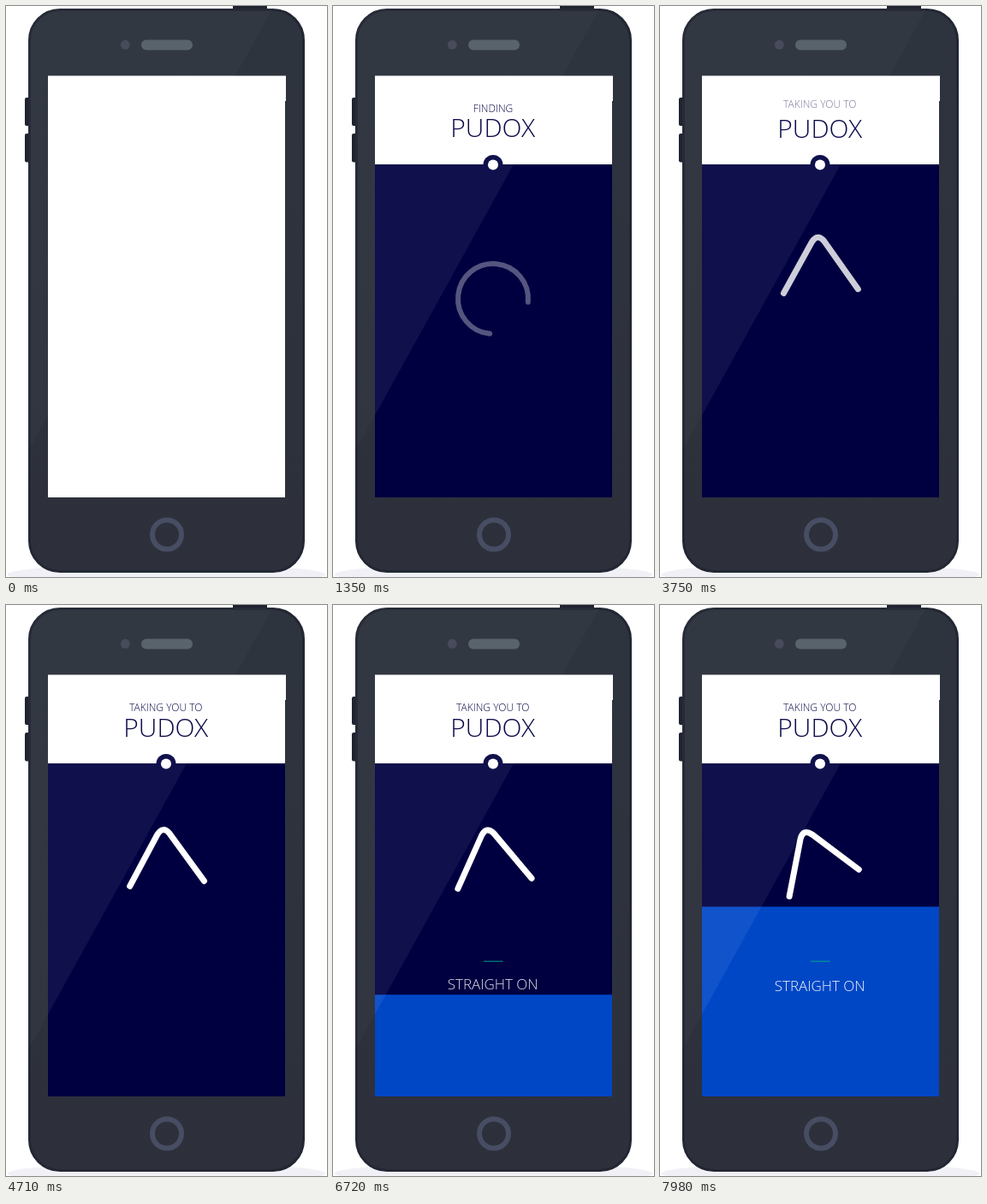
Write an HTML page that moves like this. It is 375 by 667 pixels and loops after 8 s.

```html
<!DOCTYPE html>
<html lang="en">
<head>
<meta charset="utf-8">
<title>Wayfinder phone</title>
<style>
  html, body { margin: 0; width: 100%; height: 100%; overflow: hidden; background: #fff; }
  svg { display: block; width: 375px; height: 667px; }
  text { font-family: "Open Sans", sans-serif; font-weight: 300; text-anchor: middle; fill: #0b0b4b; }
  .small { font-size: 12px; }
</style>
</head>
<body>
<svg viewBox="0 0 375 667">
  <defs>
    <linearGradient id="shell" x2="0" y2="1">
      <stop offset="0" stop-color="#2e343e"/>
      <stop offset="1" stop-color="#2d303b"/>
    </linearGradient>
    <clipPath id="screen"><path d="M49 81.5H327V111H326V574H49Z"/></clipPath>
    <clipPath id="body"><rect x="26" y="3" width="323" height="659" rx="37"/></clipPath>
    <path id="glare" d="M0 0H313.2L0 567Z" fill="#fff"/>
  </defs>

  <ellipse cx="187.5" cy="664" rx="186" ry="12" fill="#f0f0f6"/>
  <g fill="#1f2430">
    <rect x="265" y="-4" width="40" height="12" rx="2"/>
    <rect x="22" y="107" width="8" height="33" rx="2"/>
    <rect x="22" y="149" width="8" height="33.5" rx="2"/>
  </g>
  <rect x="27.5" y="4.5" width="320" height="656" rx="35.5" fill="url(#shell)" stroke="#222733" stroke-width="3"/>
  <use href="#glare" opacity=".018" clip-path="url(#body)"/>
  <circle cx="139.3" cy="45.3" r="5.5" fill="#474b5c"/>
  <rect x="158" y="39.5" width="60" height="12" rx="6" fill="#59636b"/>
  <circle cx="188" cy="617.5" r="17" fill="none" stroke="#474d62" stroke-width="6"/>

  <g clip-path="url(#screen)">
    <rect x="49" y="81" width="278" height="494" fill="#fff"/>
    <g id="panel">
      <rect x="49" width="277" height="500" fill="#000040"/>
      <circle cx="187" cy=".5" r="11.5" fill="#000040"/>
    </g>
    <rect id="progress" x="49" width="277" height="500" fill="#0047c6"/>
    <use href="#glare" opacity=".062"/>

    <circle id="pin" cx="187" cy=".5" r="6" fill="#fff"/>
    <text id="finding" class="small" x="187" y="124">FINDING</text>
    <text id="taking" class="small" x="186.7" y="124">TAKING YOU TO</text>
    <text id="place" x="186.7" y="153.5" font-size="30">PUDOX</text>
    <g fill="none" stroke="#fff" stroke-linecap="round">
      <path id="spinner" d="M29 -29A41 41 0 1 0 29 29" stroke-width="6"/>
      <path id="arrow" d="M-43.5 12.5L-7.2 -45.5Q0 -55.5 7.2 -45.5L43.5 12.5" stroke-width="7"/>
    </g>
    <path id="rule" d="M176 416.3H198.5" stroke="#00a38c" stroke-width="1.4"/>
    <text id="direction" x="186.7" y="451" font-size="17" style="fill:#fff">STRAIGHT ON</text>
  </g>
</svg>
<script>
const LOOP = 8000;
const el = id => document.getElementById(id);
const phase = (t, start, length) => Math.min(1, Math.max(0, (t - start) / length));
const easeOut = (p, power) => 1 - (1 - p) ** power;

function pose(id, opacity, x, y, angle = 0) {
  el(id).setAttribute("opacity", opacity);
  el(id).setAttribute("transform", `translate(${x} ${y}) rotate(${angle})`);
}

// Headings settle downwards while they fade in.
function settle(id, p, fade = 1) {
  pose(id, easeOut(p, 4) * fade, 0, -7 * (1 - p) ** 2);
}

// [time, degrees] turning points, joined by cosine easing
const turns = [[3300, 0], [4250, -7], [5500, 3], [8100, -21.2]];

function heading(t) {
  let angle = turns[0][1];
  for (let i = 1; i < turns.length; i++) {
    const [start, from] = turns[i - 1], [end, to] = turns[i];
    if (t >= start) angle = from + (to - from) * (1 - Math.cos(Math.PI * phase(t, start, end - start))) / 2;
  }
  return angle;
}

function draw(t) {
  const panelY = 587 - 402 * easeOut(phase(t, 60, 1000), 3);
  pose("panel", 1, 0, panelY);
  pose("pin", 1, 0, panelY);

  const intro = phase(t, 200, 1200);
  const leave = phase(t, 2490, 645) ** 2;
  settle("place", intro);
  if (leave > 0) pose("finding", 1 - leave, 0, -6 * leave);
  else settle("finding", intro);
  settle("taking", phase(t, 3500, 1400));

  // The gap in the ring is centred on 50 degrees at 1350 ms.
  const spin = 50 + (t - 1350) * 568 / 1410;
  pose("spinner", phase(t, 1100, 750) * (1 - leave), 187, 342 + 40 * leave, spin);

  const enter = easeOut(phase(t, 3300, 800), 2);
  pose("arrow", enter, 187.2, 313 + 40 * (1 - enter), heading(t));

  pose("progress", 1, 0, 575 - 0.0816 * Math.max(0, t - 5253));
  const guide = phase(t, 5250, 3000);
  settle("direction", guide, 0.95);
  pose("rule", 0.75 * easeOut(guide, 4), 0, 0);
}

function tick() {
  draw(performance.now() % LOOP);
  requestAnimationFrame(tick);
}
tick();
</script>
</body>
</html>
```
